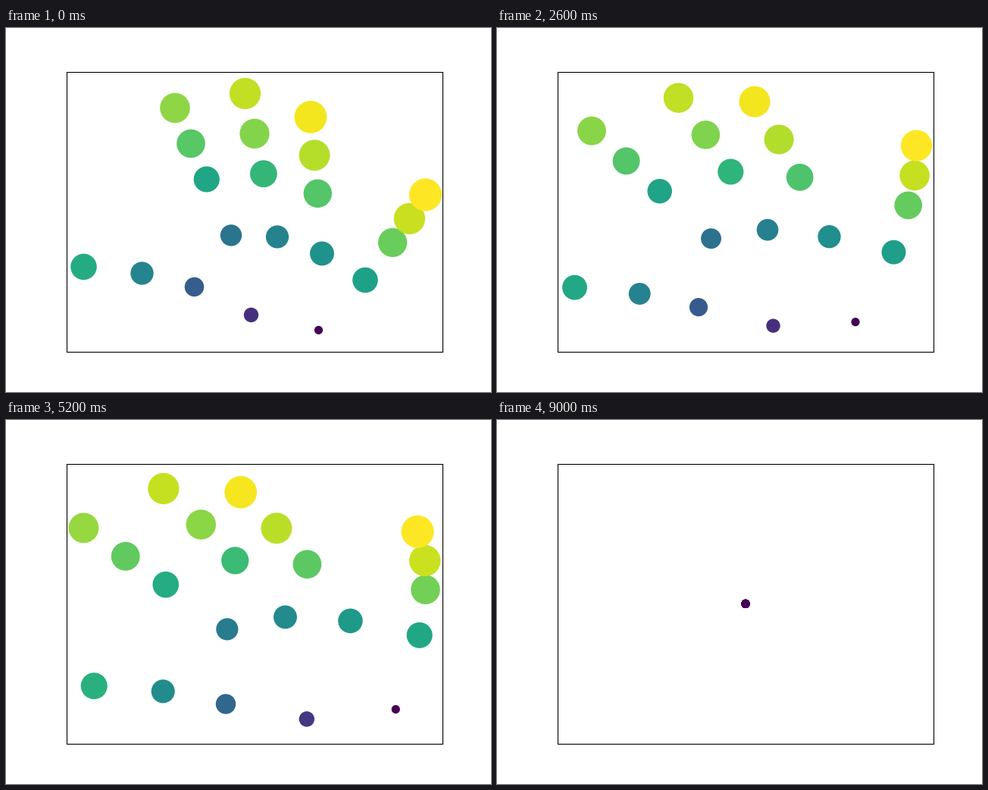
These frames come from a looping animation (640x480 px, 10 s). A matplotlib script:

```python
import numpy as np
import matplotlib.pyplot as plt
from matplotlib.animation import FuncAnimation

STEP_MS, FRAMES, LOST = 200, 50, 45
WIDTH, CENTRE = 451, (328, 242.4)
SMALL = 50  # marker area at zero depth

# Key points of three poses: wrist, thumb (base, knuckle, tip),
# then the knuckles and the tips of the four fingers.
OPEN = [(412.5, 398), (323.5, 378), (248.5, 341), (102.5, 314.5),
        (297, 273), (358, 275), (417, 297), (474, 332),
        (223, 105), (315.5, 86), (402, 117), (553.5, 219.5)]
TURNED = [(473, 387.5), (364.5, 392.5), (266, 368), (102.5, 342),
          (282.5, 277.5), (357, 266), (438.5, 275), (523.5, 295.5),
          (125, 135.5), (239.5, 92), (340, 97), (553.5, 155)]
SPREAD = [(529.5, 374), (412, 390), (305, 373), (132.5, 351),
          (300, 274), (375, 256.5), (460, 259.5), (551, 277),
          (102.5, 149), (200, 95), (299, 99.5), (533.5, 147)]
POSES = np.array([OPEN, TURNED, SPREAD])
POSE_FRAMES = [0, 13, 32]
CURL = [0.3, 1.5, 2.5]
DRIFT = 0.04  # share of the last move added per frame after the last pose


def pose_weights(frame):
    """Blend weights of the three poses, drifting on past the last one."""
    phase = np.interp(frame, POSE_FRAMES, [0, 1, 2])
    phase += DRIFT * max(0, frame - POSE_FRAMES[-1])
    if phase < 1:
        return np.array([1 - phase, phase, 0])
    return np.array([0, 2 - phase, phase - 1])


def joints(frame):
    weights = pose_weights(frame)
    keys = np.tensordot(weights, POSES, 1)
    curl = weights @ CURL
    wrist, base, knuckle, tip = keys[:4]
    points = [wrist, base, knuckle, (knuckle + tip) / 2 + (4, -4.7), tip]
    for finger in range(4):
        start, end = keys[4 + finger], keys[8 + finger]
        bow = np.array([curl * (finger + 1), 0])
        middle = [start + (end - start) * part + bow for part in (0.44, 0.72)]
        points += [start, *middle, end]
    return fit(np.array(points))


def fit(points):
    """Keep the hand centred and as wide as the view, with equal scales."""
    low, high = points.min(axis=0), points.max(axis=0)
    return CENTRE + (points - (low + high) / 2) * WIDTH / (high - low)[0]


def depths(frame):
    along = np.linspace(0, 1, 4)
    rise = along * (1.6 - 0.6 * along)
    values = [np.zeros(1), 0.14 + 0.47 * along]
    for finger in range(4):
        start, end = 0.385 + 0.062 * finger, min(1, 0.83 + 0.077 * finger)
        values.append(start + (end - start) * rise)
    sway = 1 + 0.1 * np.sin(2 * np.pi * frame / 30)
    return np.concatenate(values) ** sway


def reach(frame):
    """Marker area at full depth, as the hand nears and recedes."""
    return np.interp(frame, [0, 8, 13, 21, 32, 39, 42],
                     [900, 930, 825, 825, 980, 980, 750])


fig, ax = plt.subplots(figsize=(6.4, 4.8), dpi=100)
ax.set(xlim=(80, 576), ylim=(427.2, 57.6), xticks=[], yticks=[])
dots = ax.scatter([CENTRE[0]] * 21, [CENTRE[1]] * 21, s=SMALL,
                  c=[0] * 21, cmap="viridis", vmin=0, vmax=1)


def draw(frame):
    if frame < LOST:
        points, depth = joints(frame), depths(frame)
    else:
        points, depth = np.tile(CENTRE, (21, 1)), np.zeros(21)
    dots.set_offsets(points)
    dots.set_sizes(SMALL + (reach(frame) - SMALL) * depth)
    dots.set_array(depth)
    return [dots]


anim = FuncAnimation(fig, draw, frames=FRAMES, interval=STEP_MS,
                     repeat=True, repeat_delay=0)
plt.show()
```
